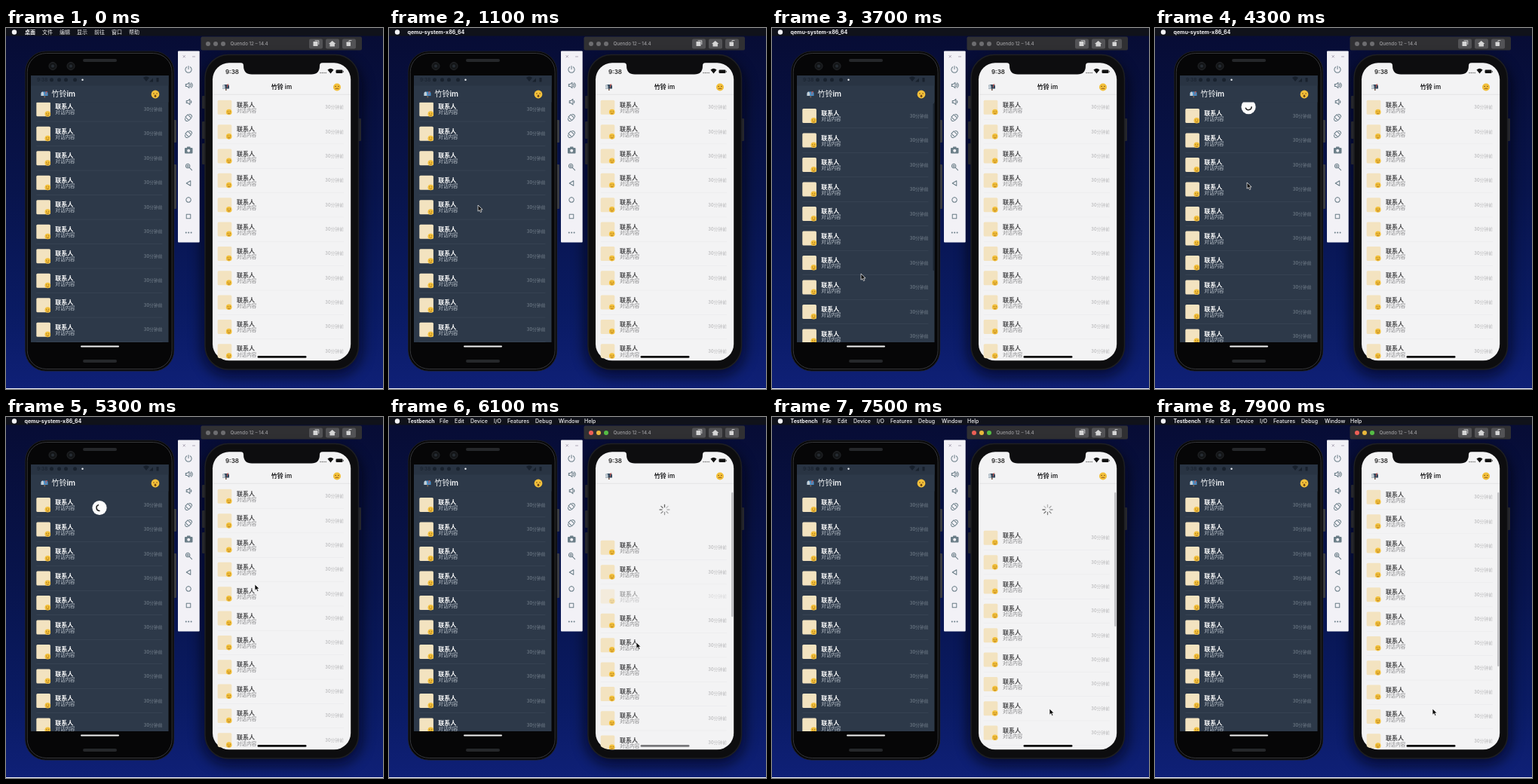
Animation of 500 by 479 pixels, one loop 8 s. Source, as an HTML page:

```html
<!DOCTYPE html>
<html lang="zh">
<head>
<meta charset="utf-8">
<title>Chat list refresh</title>
<style>
html, body { margin: 0; width: 100%; height: 100%; overflow: hidden; background: #0a1347; }
svg { display: block; width: 100vw; height: 100vh; }
text { font-family: Inter, "Noto Sans CJK SC", "Noto Sans CJK", sans-serif; }
</style>
</head>
<body>
<svg id="stage" viewBox="0 0 500 479" preserveAspectRatio="none"></svg>
<script>
const LOOP = 8000, STEP = 200;
const stage = document.getElementById('stage');
const $ = id => document.getElementById(id);

const box = (x, y, w, h, r, fill, extra = '') =>
  `<rect x="${x}" y="${y}" width="${w}" height="${h}" rx="${r}" fill="${fill}" ${extra}/>`;
const dot = (x, y, r, fill, extra = '') => `<circle cx="${x}" cy="${y}" r="${r}" fill="${fill}" ${extra}/>`;
const text = (x, y, size, fill, str, weight = 400, extra = '') =>
  `<text x="${x}" y="${y}" font-size="${size}" fill="${fill}" font-weight="${weight}" ${extra}>${str}</text>`;
const line = (d, color, width = 1, extra = '') =>
  `<path d="${d}" fill="none" stroke="${color}" stroke-width="${width}" stroke-linecap="round" stroke-linejoin="round" ${extra}/>`;
const group = (id, content, extra = '') => `<g id="${id}" ${extra}>${content}</g>`;

function face(x, y, r, mouth) {
  const eye = r * .38;
  return dot(x, y, r, '#f3c03a') +
    dot(x - eye, y - r * .2, r * .14, '#704414') + dot(x + eye, y - r * .2, r * .14, '#704414') +
    (mouth === 'open'
      ? `<ellipse cx="${x}" cy="${y + r * .42}" rx="${r * .25}" ry="${r * .32}" fill="#704414"/>`
      : line(`M${x - eye} ${y + r * .4}q${eye} ${mouth === 'smile' ? r * .4 : -r * .2} ${eye * 2} 0`, '#8a4b18', r * .17));
}

const mailbox = (x, y, body) =>
  box(x - .5, y + 1, 1.6, 3.5, 0, '#7c6254') +
  `<path d="M${x - 4.5} ${y + 2}v-3q0-2.500 2.500-2.500h4q2.500 0 2.500 2.500v3z" fill="${body}"/>` +
  `<path d="M${x - 4.5} ${y + 2}v-3q0-2.500 1.800-2.500t1.800 2.500v3z" fill="#c3ced6"/>` +
  line(`M${x + 2} ${y}v-3.500h1.500`, '#b8504c', 1);

const wifi = (x, y, fill) => `<path d="M${x - 4} ${y - 3}q4-3.4 8 0l-4 5z" fill="${fill}"/>`;

function row(theme, i) {
  const { x, top, pitch, name, sub, time, rule, right, textX } = theme;
  const c = top + i * pitch;
  return `<g class="row">` +
    box(x, c - 9.5, 18.6, 19, 1.5, '#f3e3c0') + face(x + 15, c + 6.2, 3.8, 'smile') +
    text(textX, c - .5, 8, name, '联系人', 700) +
    text(textX, c + 6.7, 6.6, sub, '对话内容') +
    text(right, c + 2, 5.6, time, '30分钟前', 500, 'text-anchor="end" letter-spacing=".15"') +
    box(x, c + 16, right - x, .5, 0, rule) + '</g>';
}
const rows = (theme, from, to) =>
  Array.from({ length: to - from }, (_, i) => row(theme, from + i)).join('');

const dark = { x: 40.3, top: 116.5, pitch: 32.5, textX: 65.3, right: 207.5,
  name: '#fff', sub: '#b9c1ca', time: '#75808d', rule: '#3f4b5b' };
const light = { x: 280.7, top: 105.3, pitch: 32.35, textX: 306, right: 448,
  name: '#4a4a4c', sub: '#88888a', time: '#b6b6b8', rule: '#e6e6e8' };

function menuBar() {
  const item = (x, str, bold) => text(x, 8.2, 7, '#f4f4f6', str, bold ? 700 : 500);
  const finder = ['桌面', '文件', '编辑', '显示', '前往', '窗口', '帮助'];
  const tools = [[24.5, 'Testbench'], [67, 'File'], [87, 'Edit'], [108, 'Device'], [139, 'I/O'],
    [157, 'Features'], [194, 'Debug'], [225, 'Window'], [259, 'Help']];
  return box(0, 0, 500, 10.5, 0, '#10121a') + dot(11, 5.5, 3.2, '#f4f4f6') +
    group('menu0', finder.map((s, i) => item(25 + i * 23, s, !i)).join('')) +
    group('menu1', item(24.5, 'qemu-system-x86_64', true)) +
    group('menu2', tools.map(([x, s], i) => item(x, s, !i)).join(''));
}

function darkPhone() {
  const lens = x => dot(x, 50.5, 5, '#141618', 'stroke="#25272a"') + dot(x, 50.5, 2, '#262c33');
  const grille = y => box(102, y, 45, 4, 2, '#25272a');
  const ink = '#18212d';
  return box(222, 122, 4, 30, 1, '#3a3c42') + box(222, 181, 4, 59, 1, '#3a3c42') +
    box(25.7, 31, 197, 424, 27, '#060607', 'stroke="#1d1e21" stroke-width="1"') +
    box(28.2, 33.500, 192, 419, 25, 'none', 'stroke="#3b3d40" stroke-width=".9"') +
    lens(62) + lens(86) + grille(41) + grille(440) +
    box(33, 63, 182.5, 354, 0, '#2d3949') +
    `<g clip-path="url(#darkClip)">` + group('darkList', rows(dark, 0, 11)) +
    box(213.6, 100, 1.6, 222, .8, '#1b2430', 'id="darkBar"') + '</g>' +
    box(33, 63, 182.5, 35.5, 0, '#2d3949') + box(33, 63, 182.5, 13.5, 0, '#293443') +
    text(41, 71, 6.5, ink, '9:38', 500) +
    [60.5, 70.5, 79.5, 91.5].map(x => dot(x, 68.8, 2.5, ink)).join('') + dot(101.5, 68.8, 1.2, '#eef1f4') +
    wifi(186, 69, ink) + `<path d="M190 71.500h5v-5z" fill="${ink}"/>` + box(199.500, 66, 3, 5.500, .5, ink) +
    mailbox(51, 88, '#4a90c8') +
    text(60.5, 91.3, 10, '#f6f8fa', '竹铃<tspan font-weight="600">im</tspan>') +
    face(198, 88, 5.4, 'open') +
    box(99, 421.5, 51, 2, 1, '#f1f1f1') +
    `<g clip-path="url(#darkClip)">` + group('loader',
      dot(0, 0, 9.6, '#fdfdfd') + line('M0 4A4 4 0 0 1-1.500-3.700', '#222', 1.5, 'id="loaderArc"')) + '</g>';
}

function toolbar() {
  const c = '#6b7e88';
  const icons = [
    [55, 'M-2.500-3.500A4.500 4.500 0 1 0 2.500-3.500M0-5v4.500'],
    [76, 'M-4-1.500h2l3-2.500v8l-3-2.500h-2zM2.500-2q2 2 0 4M4-3.500q3.500 3.500 0 7'],
    [98, 'M-3-1.500h2l3-2.500v8l-3-2.500h-2zM3.500-1.500q1.500 1.500 0 3'],
    [119, 'M-1-4.500l5 5-3.500 3.500-5-5zM-5 1q0 4 4 4M1-5q4 0 4 4'],
    [141, 'M-1-4.500l5 5-3.500 3.500-5-5zM-5 1q0 4 4 4M1-5q4 0 4 4'],
    [184, 'M1.500 1.500l3.500 3.500M-1-4a3 3 0 1 0 .1 0M-2.500-1h3M-1-2.500v3'],
    [206, 'M3-3.500v7l-6-3.500z'],
    [228, 'M0-3.500a3.500 3.500 0 1 0 .1 0'],
    [250, 'M-3-3h6v6h-6z'],
  ];
  return box(228, 30.5, 28.700, 254, 1, '#f2f1f6') +
    line('M235 36.500l2.500 2.500m0-2.500l-2.500 2.500M247.500 38h3', '#8d8598', .7) +
    icons.map(([y, d]) => line(d, c, 1.1, `transform="translate(242 ${y}) scale(.92)"`)).join('') +
    box(237, 159, 10.5, 7.5, 1, c) + box(240, 157.500, 4.500, 3, .5, c) + dot(242.2, 162.7, 2, '#f2f1f6') +
    [238.800, 242.2, 245.600].map(x => dot(x, 271.500, 1, c)).join('');
}

function lightPhone() {
  const spokes = Array.from({ length: 8 }, (_, i) =>
    line('M0-3.500V-6.500', '#666', 1.3, `opacity="${1 - i * .09}" transform="rotate(${-i * 45})"`)).join('');
  const glyphs = box(407.500, 18, 6, 6, .6, '#d5d5d5') + line('M410 16.800h4.800v4.800', '#d5d5d5', .9) +
    `<path d="M428 21l4.700-4 4.700 4h-1.500v3.500h-6.400v-3.500z" fill="#d5d5d5"/>` +
    box(451.500, 18.500, 5.500, 5.500, .7, '#d5d5d5') + line('M455 18v-1.500h3', '#d5d5d5', .8);
  const lights = colors => colors.map((c, i) => dot(268 + i * 10, 21, 3, c)).join('');
  return box(258.500, 11.5, 213.5, 18, 2, '#303033') +
    group('idleLights', lights(['#6d6d70', '#6d6d70', '#6d6d70'])) +
    group('liveLights', lights(['#ed5f56', '#e9b83c', '#55bd45'])) +
    text(297.5, 23.2, 6.2, '#9c9c9f', 'Quendo 12 – 14.4', 500) +
    [402, 424, 446].map(x => box(x, 14.5, 18, 13, 2, '#535356')).join('') + glyphs +
    box(260, 42, 212, 420, 36, '#01030f', 'filter="url(#soft)" opacity=".65"') +
    [[260, 90, 17], [260, 124, 23], [260, 153, 28], [467, 120, 30]].map(([x, y, h]) => box(x, y, 4, h, 1, '#25262b')).join('') +
    box(264, 35.5, 203.5, 417.5, 31, '#0d0d0f', 'stroke="#1e1f22" stroke-width="1.500"') +
    box(274, 46.3, 183.2, 395, 22, '#f3f3f4') +
    `<g clip-path="url(#lightClip)">` +
    group('spinner', spokes) + group('lightList', rows(light, 0, 11)) +
    box(454.300, 100, 2, 232, 1, '#b3b3b6', 'id="lightBar"') + '</g>' +
    box(274, 87.8, 183, .7, 0, '#dcdcde') +
    `<path d="M311 46q4 0 4 4q0 11.500 11 11.500h79q11 0 11-11.500q0-4 4-4z" fill="#0d0d0f"/>` +
    text(291, 60.6, 8, '#222', '9:38', 600) +
    [417, 419.4, 421.8, 424.200].map(x => dot(x, 59.500, .7, '#555')).join('') +
    wifi(430.500, 58.500, '#111') + box(437.500, 55.500, 9, 4.500, 1.2, '#111') + box(447, 56.800, 1, 2, .4, '#555') +
    mailbox(291.5, 78.5, '#34495d') +
    text(365.500, 81.2, 8, '#1d1d1f', '竹铃 im', 600, 'text-anchor="middle"') +
    face(439, 78.5, 5, 'sad') +
    box(333.5, 435, 65, 2.8, 1.4, '#0a0a0a', 'id="homeBar"');
}

stage.innerHTML = `<defs>
  <linearGradient id="sky" x2="0" y2="1">
    <stop offset="0" stop-color="#070c34"/><stop offset=".45" stop-color="#08144c"/>
    <stop offset=".8" stop-color="#0a1b64"/><stop offset="1" stop-color="#0f2077"/>
  </linearGradient>
  <filter id="soft" x="-20%" y="-20%" width="140%" height="140%"><feGaussianBlur stdDeviation="9"/></filter>
  <clipPath id="darkClip">${box(33, 98.5, 182.5, 318.5, 0, '#000')}</clipPath>
  <clipPath id="lightClip"><path d="M274 88.500h183.200v330.800q0 22-22 22h-139.200q-22 0-22-22z"/></clipPath>
  </defs>` +
  box(0, 0, 500, 479, 0, 'url(#sky)') +
  menuBar() + lightPhone() + darkPhone() + toolbar() +
  box(0, 478, 500, 1, 0, '#f5f5f8') +
  group('cursor', '<path d="M0 0v8.200l2-1.700 1.400 3 1.500-.7-1.400-2.900h2.600z" fill="#0a0a0a" stroke="#fff" stroke-width=".7"/>');

// Each step is [ms, value, ...]; values between steps are linear.
const tracks = {
  cursor: [[700, 150, 300], [1100, 118, 235], [1900, 104, 180], [2500, 106, 168], [2700, 106, 168],
    [3100, 110, 225], [3700, 118, 326], [4100, 120, 165], [4700, 126, 285], [4900, 180, 265],
    [5300, 330, 222], [5500, 329, 170], [6100, 328, 299], [6300, 328, 302], [6900, 370, 122],
    [7300, 369, 345], [7500, 368, 387]],
  darkScroll: [[2700, -8.7], [3100, 0]],
  loader: [[4100, 86], [4700, 142], [4900, 120.5]],
  lightScroll: [[5500, 0], [6100, 68], [6300, 62], [6500, 34], [6700, 8], [6900, 0],
    [7100, 45], [7300, 90], [7500, 55], [7700, 12], [7900, 1]],
};
function at(track, t) {
  const next = track.findIndex(k => k[0] > t);
  if (next < 0) return track[track.length - 1].slice(1);
  if (next === 0) return track[0].slice(1);
  const a = track[next - 1], b = track[next], p = (t - a[0]) / (b[0] - a[0]);
  return a.slice(1).map((v, i) => v + (b[i + 1] - v) * p);
}

const show = (id, on) => $(id).setAttribute('visibility', on ? 'visible' : 'hidden');
const move = (id, x, y) => $(id).setAttribute('transform', `translate(${x} ${y})`);
const pressedRow = $('lightList').querySelectorAll('.row')[2];

function render(ms) {
  const t = Math.max(0, Math.floor((ms + 100) / STEP) * STEP - 100);
  const app = t < 700 ? 0 : t < 5500 ? 1 : 2;
  for (let i = 0; i < 3; i++) show('menu' + i, i === app);
  show('idleLights', app < 2);
  show('liveLights', app === 2);
  show('cursor', t >= 700);
  move('cursor', ...at(tracks.cursor, t));

  move('darkList', 0, at(tracks.darkScroll, t)[0]);
  show('darkBar', t >= 2900 && t < 4100);
  show('loader', t >= 4100 && t < 5700);
  move('loader', 124, at(tracks.loader, t)[0]);
  $('loaderArc').setAttribute('transform', `rotate(${(t - 5300) * .45})`);

  const pull = at(tracks.lightScroll, t)[0];
  move('lightList', 0, pull);
  show('lightBar', t >= 5700);
  $('lightBar').setAttribute('height', 232 - pull * .98);
  show('spinner', pull > 25);
  $('spinner').setAttribute('transform', `translate(365.500 123) rotate(${Math.floor((t - 6100) / 100) * 45})`);
  const touching = t >= 5700 && t < 6300;
  pressedRow.setAttribute('opacity', touching ? .45 : 1);
  $('homeBar').setAttribute('fill', touching ? '#77777a' : '#0a0a0a');
}

const start = performance.now();
function tick() {
  render((performance.now() - start) % LOOP);
  requestAnimationFrame(tick);
}
tick();
</script>
</body>
</html>
```
